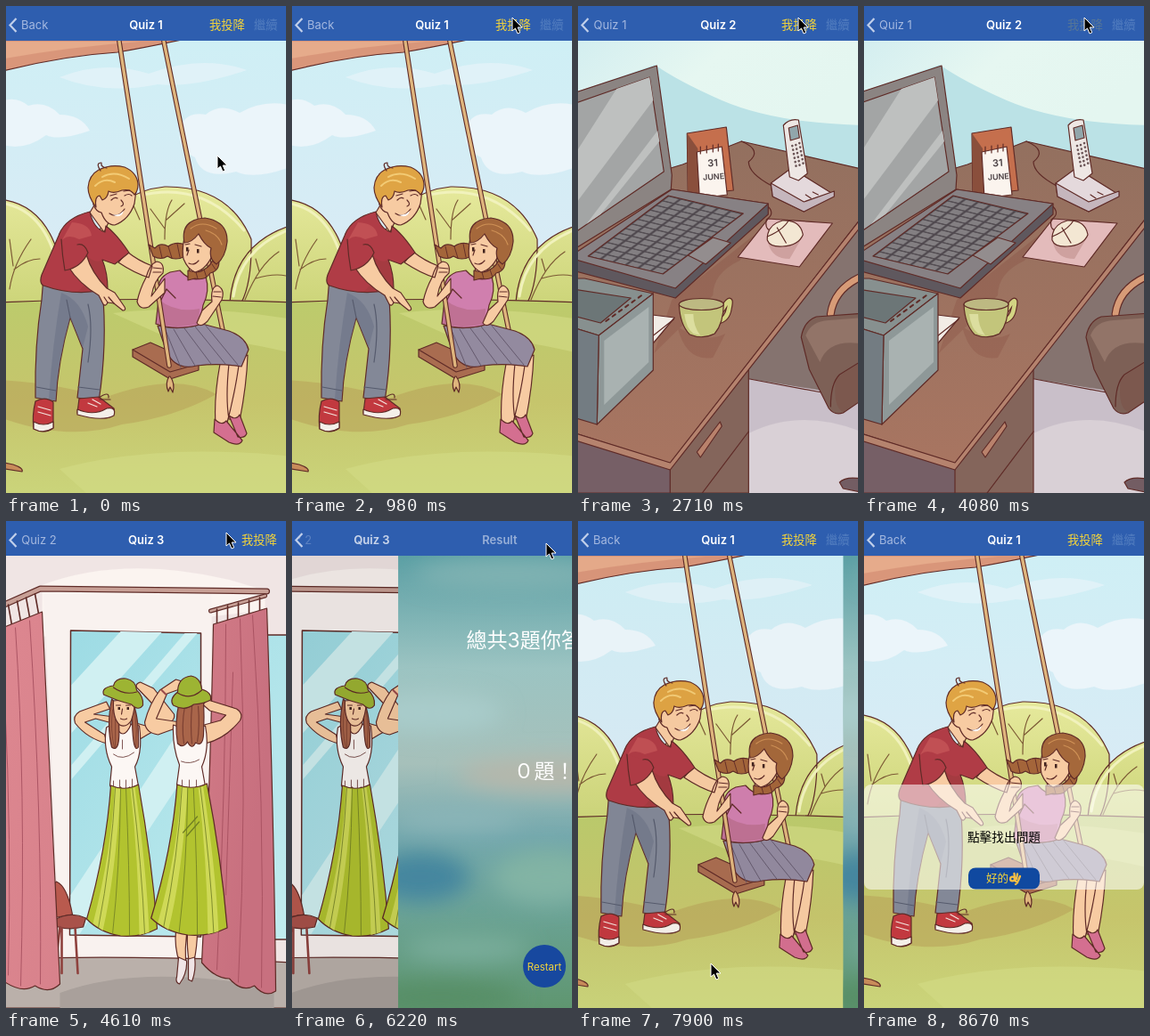
Animation, 314 px wide and 547 px high, one loop 9300 ms. Source, as an HTML page:

```html
<!DOCTYPE html>
<html lang="zh-Hant">
<head>
<meta charset="utf-8">
<title>Quiz</title>
<style>
html, body { margin: 0; width: 100%; height: 100%; overflow: hidden; }
svg { display: block; width: 100vw; height: 100vh; }
text { font: 13.3px Inter, "Noto Sans CJK TC", "Noto Sans CJK JP", sans-serif; stroke: none; }
.page { stroke: #5f2b27; stroke-width: 1.2; stroke-linejoin: round; stroke-linecap: round; }
.n { stroke: none; }
.l { fill: none; }
.skin { fill: #f7cba2; }
.shade { stroke: none; fill: #7a3a2e; opacity: .2; }
.mid { text-anchor: middle; }
.title { font-weight: 600; font-size: 13px; fill: #fff; text-anchor: middle; }
.label { font-size: 13px; fill: #a5b9e0; }
.give { fill: #f4d43a; }
.next { fill: #527dbf; }
</style>
</head>
<body>
<svg viewBox="0 0 314 547">
<defs>
  <clipPath id="bounds"><path d="M-7 39H321V547H-7Z"/></clipPath>
  <linearGradient id="sky" x2="0" y2="1"><stop stop-color="#cfeff5"/><stop offset="1" stop-color="#dbeaf5"/></linearGradient>
  <linearGradient id="grass" x2="0" y2="1"><stop stop-color="#bccb6c"/><stop offset=".5" stop-color="#c6c56c"/><stop offset="1" stop-color="#cbd67c"/></linearGradient>
  <linearGradient id="bush" x2="0" y2="1"><stop stop-color="#e6e99c"/><stop offset="1" stop-color="#cdd57a"/></linearGradient>
  <linearGradient id="drape" x2="1" y2=".2"><stop stop-color="#dd8790"/><stop offset=".6" stop-color="#d57f89"/><stop offset="1" stop-color="#c8707f"/></linearGradient>
  <linearGradient id="glass" x2="1" y2="1"><stop stop-color="#9ddbe4"/><stop offset="1" stop-color="#c2ecef"/></linearGradient>
  <linearGradient id="wood" x2="0" y2="1"><stop stop-color="#93705f"/><stop offset="1" stop-color="#a87561"/></linearGradient>
  <linearGradient id="wall" x2="1" y2=".3"><stop stop-color="#d3eef0"/><stop offset=".5" stop-color="#e6f7f1"/><stop offset="1" stop-color="#e4f6f0"/></linearGradient>
  <linearGradient id="haze" x2="0" y2="1">
    <stop stop-color="#5b9fa4"/><stop offset=".25" stop-color="#9cc4c2"/><stop offset=".46" stop-color="#a6c0ba"/>
    <stop offset=".62" stop-color="#74a8ad"/><stop offset=".8" stop-color="#6aa293"/><stop offset="1" stop-color="#5f9670"/>
  </linearGradient>
  <filter id="blur" x="-50%" y="-50%" width="200%" height="200%"><feGaussianBlur stdDeviation="12"/></filter>
  <pattern id="keys" width="10" height="10" patternUnits="userSpaceOnUse" patternTransform="matrix(.69 -.52 1.4 .34 10 281)">
    <path class="n" fill="#4f484e" d="M0 0H10V10H0Z"/><path class="n" fill="#837f82" d="M1 1H9V9H1Z"/>
  </pattern>
  <g id="skirt">
    <path fill="#b2c32f" d="M117 297Q132 304 148 296Q163 380 169 458Q150 468 128 466Q104 462 90 447Q112 370 117 297Z"/>
    <path class="n" fill="#cfd957" d="M121 300L128 301Q122 400 108 460L97 452Q118 370 121 300ZM139 301L144 299Q157 390 160 462L149 465Q148 380 139 301Z"/>
    <path class="l" stroke="#6f7d24" stroke-width=".8" d="M122 300Q118 380 103 457M128 301Q127 390 119 464M134 301Q138 390 138 466M141 299Q152 390 155 464"/>
  </g>
</defs>

<rect width="314" height="547"/>

<g class="page" clip-path="url(#bounds)">
  <path class="n" fill="url(#sky)" d="M-7 39H321V340H-7Z"/>
  <g class="n" fill="#ebf5fa">
    <path d="M-7 108Q10 100 25 112Q45 106 60 122Q84 122 94 140Q60 152 45 145Q20 164 -7 155Z"/>
    <path d="M196 134Q204 118 224 122Q240 108 262 120Q290 104 321 112V180Q280 196 258 186Q220 196 212 170Q190 160 196 134Z"/>
    <path opacity=".6" d="M60 80Q110 60 160 76Q220 54 270 72Q210 92 170 88Q110 100 60 80Z"/>
  </g>
  <path fill="url(#bush)" d="M-7 217Q42 222 59 280Q64 312 56 333H-7ZM86 333Q92 212 178 203Q250 202 275 262Q276 310 264 333ZM251 333Q256 266 321 246V333Z"/>
  <path class="l" stroke="#f1f2bc" stroke-width="3" d="M-7 221Q39 227 55 282M150 213Q220 196 267 252M255 326Q263 271 321 250"/>
  <path class="l" stroke="#7c5a35" d="M4 318Q8 290 28 262M8 292L4 262M9 296Q24 284 38 284M178 262Q178 230 186 218M178 250L162 228M180 240L200 222M150 240L142 222M268 330Q284 290 306 276M280 306Q300 300 314 303M284 298L280 284"/>
  <path fill="url(#grass)" d="M-7 333Q150 326 321 333V560H-7Z"/>
  <path class="n" fill="#b9a65a" opacity=".6" d="M-7 420Q60 424 110 440Q190 410 236 436Q190 462 130 470Q70 490 -7 462Z"/>
  <path class="n" fill="#d2da84" opacity=".7" d="M120 345Q220 334 321 352V390Q240 370 180 372ZM60 520Q170 490 321 506V547H90Z"/>
  <path fill="#d9967a" d="M-7 36H206Q160 46 125 52Q62 56 -7 74Z"/>
  <path class="n" fill="#e6ab8b" d="M-7 40H150Q70 46 -7 60Z"/>
  <path fill="#c88b5a" d="M-7 512L8 515Q20 519 18 523L-7 519Z"/>
  <g class="l">
    <path stroke-width="5.6" d="M177 40L245 374"/><path stroke="#dfb57d" stroke-width="3.4" d="M177 40L245 374"/>
  </g>

  <!-- girl -->
  <path class="skin" d="M250 402Q246 440 250 464L262 466Q270 425 271 392ZM240 402Q233 440 235 470L247 472Q258 430 262 396Z"/>
  <path fill="#d46f90" d="M250 460Q258 466 262 459L270 480Q268 486 260 484ZM234 464Q242 472 247 466L265 488Q262 495 250 490L233 479Z"/>
  <path fill="#a96c50" d="M142 386L162 378L216 402V409L184 419L142 394Z"/><path class="l" d="M142 386L184 411L216 402"/>
  <path fill="#938a9f" d="M170 359Q195 365 220 357L250 365Q269 372 272 386L264 405Q240 401 214 404Q190 410 180 388Z"/>
  <path class="l" stroke="#5f5468" stroke-width=".9" d="M178 362L196 406M188 363L212 404M200 362L230 402M212 360L246 402M224 359L260 403"/>
  <path fill="#d07fae" d="M184 299Q168 306 172 322L168 357Q190 365 217 358L221 336Q229 320 224 304Q208 312 195 297Z"/>
  <path class="shade" d="M172 330Q190 345 217 340L216 357Q190 363 169 357Z"/>
  <path class="l" d="M180 318l-6 12M180 318l10 10"/>
  <g class="l">
    <path stroke-width="5.6" d="M127 40L183 404"/><path stroke="#dfb57d" stroke-width="3.4" d="M127 40L183 404"/>
  </g>
  <path fill="#dfb57d" d="M183 416Q178 424 182 433L184 428L187 434Q190 424 184 416Z"/>
  <path class="skin" d="M126 288Q144 300 160 305L164 292Q148 286 136 276ZM178 306L163 326Q166 308 176 300Q178 288 169 287Q161 290 157 305Q150 318 147 332Q150 342 160 338L178 322ZM220 342L231 332Q229 316 237 314Q246 318 242 330L226 354Q218 362 214 356ZM205 288L206 304Q214 308 218 303L220 292Z"/>
  <path class="l" d="M165 294l10 1M165 299l9 0M233 321l8 0M232 326l9 1"/>
  <path fill="#a4653a" d="M201 268Q190 264 182 270Q173 265 167 272L160 268L165 281Q174 286 181 281Q190 287 201 281ZM238 280Q242 297 229 300Q223 309 212 306L204 308L204 297Q216 301 222 296Q230 292 233 282Z"/>
  <path class="l" stroke-width=".9" d="M182 270l4 13M172 270l3 13M192 267l3 15M222 296l3 9M213 299l2 7M231 290l4 6"/>
  <path class="skin" d="M200 260Q197 274 199 284Q204 296 212 299Q226 296 234 274Q226 250 205 252Z"/>
  <path fill="#a5683b" d="M200 266Q195 240 223 238Q249 242 248 265Q246 283 236 290Q227 284 230 272Q222 268 216 256Q208 266 200 266Z"/>
  <path class="l" stroke="#cf9156" d="M207 250Q220 240 236 250M224 252Q238 256 242 268"/>
  <path class="l" d="M205 289Q211 292 216 286M201 268l5 -1M212 268l7 2M205 274l-2 6"/>
  <path class="n" fill="#43251f" d="M202 271h2.500v4.500h-2.500ZM214 273h2.500v4.500h-2.500Z"/>

  <!-- boy -->
  <path fill="#838897" d="M42 304L40 330Q32 380 33 440L56 444Q58 400 72 350L86 385L80 440L104 444Q114 380 108 316Z"/>
  <path class="n" fill="#6d7487" opacity=".6" d="M62 322Q52 380 48 442L55 443Q58 400 72 350L86 384L92 360Q84 330 62 322Z"/>
  <path class="l" stroke="#565b6d" d="M34 428l22 4M81 428l24 3M72 350L68 330M92 400Q98 360 92 335"/>
  <path fill="#c2393f" d="M33 444Q44 438 53 445V474Q44 481 31 475Q29 460 33 444ZM82 441L104 439L121 452Q124 463 108 463L80 457Z"/>
  <path fill="#f4efe9" d="M31 467Q42 473 53 467V474Q42 481 31 475ZM80 453Q98 461 113 452Q124 450 121 460Q108 467 80 459Z"/>
  <path class="l" stroke="#f4e6df" d="M36 450l14 4M36 456l14 4M92 446l10 4M97 442l9 5"/><path class="l" d="M104 440q12-8 11 0M105 442l12 0"/>
  <path class="skin" d="M100 222L94 232L110 254L115 243Z"/>
  <path fill="#b03c46" d="M94 231Q66 238 59 258L40 302Q37 311 42 314Q78 327 114 318Q114 300 108 285L122 290L138 277Q124 256 112 247L111 254Q98 250 94 231Z"/>
  <path class="n" fill="#c9595b" opacity=".7" d="M74 243Q94 244 96 258L82 262Q66 254 60 268Z"/>
  <path class="shade" d="M90 280Q100 290 108 285L113 316L80 321Q96 310 90 280Z"/>
  <path class="skin" d="M70 293Q82 312 104 325L109 335Q112 338 114 333L121 334L131 342Q135 342 133 338L122 322L113 317Q96 300 90 279Z"/>
  <path class="l" d="M114 333L110 327M121 334L115 327"/>
  <path fill="#b03c46" d="M62 262Q63 280 66 297Q84 294 92 277Q88 266 80 268"/>
  <path class="skin" d="M106 206L102 214Q96 214 98 223Q101 231 107 232Q112 246 122 246Q138 240 144 222L146 207L130 196Z"/>
  <path fill="#dfa444" d="M101 226Q92 214 92 204Q93 190 104 184Q118 177 133 181Q147 187 148 200Q148 208 144 212Q140 205 130 207Q121 211 115 208Q114 216 108 218L105 213Q99 214 101 226Z"/>
  <path class="l" d="M106 185Q100 176 107 176Q106 181 113 182M116 233Q125 239 133 228M129 218q5 5 0 7M118 218q4-4 7-2M133 213q5-3 8 0M117 213l7-2M132 208l7-1"/>
  <path class="l" stroke="#f3cb75" stroke-width="2" d="M108 192Q122 184 138 194M100 202Q110 192 122 198"/>
  <path class="n" fill="#fff" d="M119 234Q126 236 132 230Q129 240 119 234Z"/>
</g>

<g class="page" clip-path="url(#bounds)">
  <path class="n" fill="#bbe2e6" d="M-7 39H321V260H-7Z"/>
  <path class="n" fill="url(#wall)" d="M-7 39H321V134Q220 132 160 106Q110 84 85 66L-7 98Z"/>
  <path class="n" fill="#85736f" d="M180 250H321V440H180Z"/>
  <path class="n" fill="#c9bfc9" d="M186 418L321 440V547H186Z"/><path class="n" fill="#d9d0d6" d="M190 480Q250 450 321 480V547H190Z"/><path class="l" d="M186 418L272 434"/>
  <path fill="#765f66" d="M-7 484L103 518V547H-7Z"/>
  <path fill="#84655b" d="M102 518L190 400V547H102Z"/><path class="l" d="M138 547L190 478"/>
  <path fill="#b9826c" d="M132 501L158 467L160 472L136 507Z"/>
  <path fill="url(#wood)" d="M-7 215L116 178L182 152L321 184V232L102 514L-7 479Z"/>
  <path fill="#b5836e" d="M-7 479L102 513L321 232V241L102 521L-7 487Z"/>
  <path class="shade" d="M104 330L213 244L180 286Q150 300 150 325L84 390ZM110 360Q140 380 164 368L150 395Q120 400 110 360Z"/>
  <path class="l" d="M182 152Q206 162 190 175Q190 188 216 202"/>
  <path fill="#c56f4d" d="M121 143L165 136L173 207L122 213Z"/><path class="n" fill="#8a4f3c" d="M121 143L133 160L136 212L122 213Z"/>
  <path fill="#fbf4ee" d="M132 164L160 158L166 212L135 216Z"/><path class="l" d="M136 158v8M143 157v8M150 156v8M156 155v8"/>
  <text class="mid" transform="rotate(-4 150 180)" x="150" y="180" style="font-size:11px;font-weight:600" fill="#493f42">31</text>
  <text class="mid" transform="rotate(-4 151 195)" x="151" y="195" style="font-size:9px;font-weight:600" fill="#493f42">JUNE</text>
  <path fill="#e4d9dc" d="M215 199L238 182L286 212L252 231L217 214Z"/><path fill="#c5b6bd" d="M215 199L252 220L286 208V214L252 231L217 214Z"/>
  <path fill="#eee7e4" d="M229 134Q236 126 246 128L256 188L246 196L236 192Z"/><path fill="#91a6ab" d="M235 137L245 134L247 148L237 151Z"/>
  <path class="l" stroke="#6b5557" stroke-width="2.6" stroke-dasharray=".1 4.5" d="M239 157l5 27M243 156l5 27M247 154l5 27"/><path class="l" d="M254 212l6 4M262 209l6 3"/>
  <path fill="#e3bbbb" d="M212 239L284 244L247 293L178 282Z"/>
  <path class="shade" d="M212 266Q230 276 250 260L236 284Q216 284 212 266Z"/>
  <path class="l" d="M208 222Q222 232 210 240Q208 250 214 252"/>
  <path fill="#f3e7d3" d="M211 263Q210 246 228 241Q248 240 251 257Q246 269 228 270Q214 271 211 263Z"/><path class="l" d="M211 259Q228 252 235 241M222 249l10 17"/>
  <path fill="#8b8482" d="M-7 98L87 67L104 190L103 206L-7 274Z"/><path fill="#a3a5a5" d="M-7 110L79 80L95 186L-7 256Z"/>
  <path class="n" fill="#bec0bf" d="M42 93L79 80L83 106L-7 226V170ZM88 140L90 152L24 234L8 245Z"/>
  <path fill="#5f585e" d="M-7 281L104 206L212 222V234L108 328L-7 297Z"/><path fill="#878184" d="M-7 279L104 206L212 222L108 317L-7 284Z"/>
  <path fill="url(#keys)" d="M10 281L100 213L184 233L94 301Z"/><path fill="#938d8e" d="M122 280L150 260L170 266L142 290Z"/>
  <path fill="#f2ece6" d="M82 347L107 350L82 380Z"/><path class="l" d="M82 371L106 352"/>
  <path fill="#87908f" d="M-7 306L6 306L83 323L22 370L-7 361Z"/><path fill="#6c7677" d="M-7 318L58 328L24 356L-7 348Z"/>
  <path fill="#8e9898" d="M22 370L83 323V409L20 470Z"/><path fill="#737c82" d="M-7 361L22 370L20 470L-7 462Z"/>
  <path class="n" fill="#a9b2b1" d="M28 376L78 338V400L28 448Z"/><path class="l" stroke-width="2" stroke-dasharray="4 5" d="M30 354L70 325"/>
  <path class="l" stroke-width="7" d="M161 340Q172 322 168 340Q166 352 156 354"/><path class="l" stroke="#d3d483" stroke-width="4.6" d="M161 340Q172 322 168 340Q166 352 156 354"/>
  <path fill="#c3c57b" d="M112 335Q113 358 124 369Q138 375 152 368Q162 356 162 334Z"/><path class="n" fill="#dcde9f" d="M118 346Q120 362 128 368L136 370Q128 360 128 346Z"/>
  <ellipse cx="137" cy="335" rx="25" ry="6.5" fill="#bdb982"/>
  <path class="l" stroke-width="9" d="M282 346Q286 316 321 302"/><path class="l" stroke="#d79b77" stroke-width="6.600" d="M282 346Q286 316 321 302"/>
  <path fill="#7d6056" d="M249 372Q252 354 266 349L321 345V440L296 457Q286 460 280 452L258 408Z"/>
  <path class="n" fill="#927468" d="M254 370Q260 354 280 353L321 350V380Q280 372 270 400Z"/>
  <path class="shade" d="M288 418L321 396V440L296 456Q284 450 288 418Z"/><path class="l" d="M282 450Q282 424 292 414L321 396"/>
  <path fill="#735d63" d="M292 535Q300 527 321 532V547L296 542Z"/>
</g>

<g class="page" clip-path="url(#bounds)">
  <path class="n" fill="#f0e5e4" d="M-7 39H321V547H-7Z"/><path class="n" fill="#fbf4f0" d="M40 72Q130 38 250 66L290 78V100L40 130Z"/>
  <path class="n" fill="#f9f2ef" d="M42 82H230V490H60Z"/>
  <path fill="#bab0aa" d="M-7 492Q150 487 321 496V547H-7Z"/><path class="n" fill="#a9a09b" d="M60 530Q150 496 300 525V547H60Z"/>
  <path fill="url(#glass)" stroke-width="1.500" d="M72 123L218 126V467L71 465ZM292 128H321V470H298Z"/>
  <path class="n" fill="#d0f0f2" d="M128 124L174 125L73 238V184ZM217 200V260L82 464H72V420ZM200 126L214 126L73 290V274Z"/>
  <path class="l" stroke-width="7" d="M-7 96L38 76L292 79"/><path class="l" stroke="#c8a096" stroke-width="4.6" d="M-7 96L38 76L292 79"/>
  <path class="l" stroke-width="5" d="M229 101L290 84"/><path class="l" stroke="#c8a096" stroke-width="2.8" d="M229 101L290 84"/>
  <path class="l" stroke-width="1.6" d="M2 94l4 23M12 90l4 23M22 86l4 22M32 82l4 22M236 99v16M248 95v16M260 92v16M272 89v15M284 86v14"/>
  <path fill="#b95a4e" d="M51 446Q48 410 56 405Q68 410 74 442Z"/><path fill="#a9524a" d="M54 448Q72 438 89 446L86 456Q70 460 54 455Z"/><path class="l" stroke-width="2.6" stroke="#8f423e" d="M60 456L56 490M77 457L80 508M62 457V508"/>
  <path fill="url(#drape)" d="M-7 121L40 102Q50 320 60 520Q48 532 32 522Q16 532 -7 514ZM232 116L292 98Q300 340 302 528Q290 536 278 522Q264 530 250 514Q234 514 219 496Q228 320 232 116Z"/>
  <path class="l" stroke="#a6505f" stroke-width=".9" d="M10 120Q22 300 16 522M26 112Q40 330 38 520M-2 200Q6 360 2 510M246 116Q246 300 236 504M262 110Q270 320 260 518M276 106Q290 320 286 524M254 170Q250 300 246 420"/>

  <path class="skin" d="M122 228L100 222L88 226L110 240L113 250Q90 244 77 227Q74 219 82 214L112 203L116 211L98 217L120 220ZM142 226L156 230L170 212L148 189Q142 184 150 181L165 188L188 217Q190 224 180 228L158 240L148 246ZM124 220L140 220L138 240L126 240Z"/>
  <path fill="#fcf7f4" d="M112 232Q118 228 122 228Q130 250 140 228L149 230Q153 260 144 276L148 298Q142 306 138 299Q132 307 128 299Q120 306 116 297L118 276Q108 256 112 232Z"/>
  <path class="l" stroke-width=".8" d="M120 262Q130 270 143 260M130 246v10M120 292v9M127 291v9M134 291v9M141 290v9"/>
  <path fill="#a9654a" d="M118 200Q112 230 118 254Q128 262 126 226L122 204ZM141 202Q149 220 148 254Q142 262 141 226Z"/>
  <path class="l" stroke="#7c4032" stroke-width=".8" d="M119 212Q116 234 121 255M122 220v34M144 214Q147 234 145 255"/>
  <path class="skin" d="M120 202Q119 222 127 229Q134 233 140 224Q145 210 143 200Z"/>
  <path class="l" d="M123 207l5 0M134 207l5 0M130 211l-1 6M128 222q4 2 7 0"/><path class="n" fill="#43251f" d="M125 209h2.5v3h-2.5ZM135 209h2.5v3h-2.5Z"/>
  <path fill="#9db433" d="M109 195Q106 187 120 185Q122 176 134 177Q145 179 146 190Q154 197 153 207Q148 214 140 206Q124 202 109 195Z"/><path class="l" d="M120 187Q132 196 146 192"/>
  <use href="#skirt"/>

  <path class="skin" d="M190 460Q188 478 194 496H201Q200 480 202 464ZM203 462Q202 480 205 496H210Q214 478 214 460Z"/>
  <path fill="#f0e5e6" d="M193 490L202 494Q203 508 194 520Q189 518 191 512ZM204 492L211 490Q213 504 208 517L204 515Z"/>
  <path class="skin" d="M192 232L170 240Q156 238 155 226Q160 206 172 190L190 178L200 181L194 189L180 194L168 222L195 226ZM218 230L240 224L246 218L228 213L220 206L226 201L258 211Q266 216 262 224Q246 244 223 250Z"/>
  <path class="l" stroke="#9a4a4a" stroke-width="2" d="M174 190l5 5"/>
  <path fill="#fcf7f4" d="M187 229Q206 236 223 230Q228 256 219 276L223 298Q216 306 212 299Q206 307 202 299Q196 305 191 296L194 274Q186 254 187 229Z"/><path class="l" stroke-width=".8" d="M197 291v9M205 291v9M213 291v9M196 270Q206 274 216 268"/>
  <path fill="#a9654a" d="M194 202Q188 228 192 250Q198 256 203 248Q208 258 212 249Q220 254 221 240Q222 220 221 200Z"/><path class="l" stroke="#7c4032" d="M200 208Q196 230 199 250M208 208Q206 230 208 250M215 208Q217 230 214 248"/>
  <path fill="#9db433" d="M187 207Q182 200 192 192Q192 176 207 174Q218 176 219 189Q231 193 229 201Q222 205 210 206Q200 214 187 207Z"/><path class="l" d="M192 193Q206 202 219 190"/>
  <use href="#skirt" transform="matrix(1.08 0 0 1 65 -1)"/>
  <path class="l" stroke="#6f7d24" d="M198 350l16-18M202 354l14-16"/>
</g>

<g class="page" clip-path="url(#bounds)">
  <g class="n">
    <path fill="url(#haze)" d="M-7 39H321V547H-7Z"/>
    <g filter="url(#blur)">
      <ellipse cx="120" cy="60" rx="110" ry="18" fill="#80b2b2"/>
      <ellipse cx="30" cy="215" rx="80" ry="22" fill="#a9cccb"/>
      <ellipse cx="170" cy="285" rx="110" ry="20" fill="#b6b7ab"/>
      <ellipse cx="60" cy="335" rx="70" ry="12" fill="#8cb6b9"/>
      <ellipse cx="18" cy="400" rx="55" ry="28" fill="#44869f"/>
      <ellipse cx="160" cy="400" rx="60" ry="30" fill="#82b4a4"/>
      <ellipse cx="70" cy="480" rx="70" ry="14" fill="#7aae9c"/>
      <ellipse cx="270" cy="190" rx="50" ry="70" fill="#84b3b8"/>
      <ellipse cx="40" cy="535" rx="90" ry="18" fill="#568e66"/>
    </g>
  </g>
  <g class="mid" fill="#fff">
    <text x="157" y="142" style="font-size:23px">總共3題你答對了</text>
    <text x="157" y="289" style="font-size:23px">０題！</text>
    <circle class="n" cx="157" cy="500" r="24" fill="#17489f"/>
    <text class="give" x="157" y="504.5" style="font-size:11.5px">Restart</text>
  </g>
</g>

<rect width="314" height="39" fill="#2e5eaf"/>
<g id="nav"></g>
<path fill="#2e5eaf" d="M0 0H8V39H0Z"/>
<path d="M11.5 14L4.5 21.5L11.5 29" fill="none" stroke="#c0cfea" stroke-width="2.2"/>

<g id="popup" class="mid">
  <rect y="296" width="314" height="118" rx="8" fill="#fff" opacity=".56"/>
  <text x="157" y="360" style="font-size:13.7px">點擊找出問題</text>
  <rect x="117" y="389.5" width="80" height="24" rx="8" fill="#1049a0"/>
  <text class="give" x="149.5" y="406" style="font-size:12.5px">好的</text>
  <g fill="none" stroke="#f6bf45" stroke-width="2.3" stroke-linecap="round">
    <circle cx="166.5" cy="402" r="2.4"/><path d="M169 401L168.5 396M171 402L172 396.5M173 404L175 399M169.500 404L172 406L170 408"/>
  </g>
</g>
<path id="cursor" d="M0 0V15L3.5 12L6 18L8.7 16.8L6.2 11H11Z" fill="#000" stroke="#fff"/>
</svg>
<script>
const LOOP = 9300, WIDTH = 328, CENTER = 157, LABEL_X = 17;
const $ = id => document.getElementById(id);
const clamp = v => Math.max(0, Math.min(1, v));
const ease = v => v * v * (3 - 2 * v);

// Critically damped spring, time in ms
function spring(t) {
  const k = Math.max(0, t) * 0.01826;
  return k > 9.5 ? 1 : 1 - (1 + k) * Math.exp(-k);
}

const both = '<text class="give" x="228" y="26">我投降</text><text class="next" x="278" y="26">繼續</text>';
const bars = [
  { title: 'Quiz 1', back: 'Back', width: 29, slide: 85, buttons: both },
  { title: 'Quiz 2', back: 'Quiz 1', width: 39, slide: 85, buttons: both },
  { title: 'Quiz 3', back: 'Quiz 2', width: 39, slide: 85, buttons: '<text class="give" x="264" y="26">我投降</text>' },
  { title: 'Result', back: 'Quiz 3', width: 39, slide: 172, buttons: '' }
];
$('nav').innerHTML = bars.map(b => `<g><text class="label" y="26">${b.back}</text>
  <text class="title" y="26">${b.title}</text><g>${b.buttons}</g></g>`).join('');
const pages = [...document.querySelectorAll('.page')];
const items = [...$('nav').children];

// low lies under high; a pop uncovers low again
const moves = [
  { at: -9000, low: 0, high: 3, pop: true },
  { at: 2290, press: 2240, low: 0, high: 1 },
  { at: 4135, press: 4080, low: 1, high: 2 },
  { at: 6107, press: 6040, low: 2, high: 3 },
  { at: 7666, low: 0, high: 3, pop: true }
];
const cursorKeys = [
  [30, 237, 168], [250, 284, 106], [450, 273, 57], [690, 273, 57], [980, 247, 13], [5540, 247, 13],
  [5680, 285, 25], [6480, 285, 25], [6920, 147, 400], [7060, 147, 400], [7380, 149, 497]
];

function place(el, x, opacity) {
  el.setAttribute('x', x);
  el.style.opacity = opacity;
}

function drawBar(item, bar, s, isLow) {
  const [label, title, buttons] = item.children;
  const q = s ** 1.2;
  if (isLow) {
    place(title, CENTER - 121 * q, 1 - s ** 3);
    place(label, LABEL_X - (bar.width + LABEL_X) * s, 1 - s);
    buttons.style.opacity = clamp(1 - 2 * s);
  } else {
    place(title, CENTER + bar.slide * (1 - q), s ** 1.4);
    place(label, LABEL_X + 121 * (1 - q), s ** 3);
    buttons.style.opacity = clamp(2 * s);
  }
}

function cursorAt(t) {
  const i = cursorKeys.findIndex(k => k[0] > t);
  if (i < 1) return cursorKeys.at(i).slice(1);
  const [t0, x0, y0] = cursorKeys[i - 1], [t1, x1, y1] = cursorKeys[i];
  const e = ease((t - t0) / (t1 - t0));
  return [x0 + (x1 - x0) * e, y0 + (y1 - y0) * e];
}

function draw(t) {
  const move = moves.findLast(m => m.at <= t);
  const p = spring(t - move.at), s = move.pop ? 1 - p : p;
  const navS = move.pop ? clamp(1.1 * s - 0.1) : s;
  const pressed = moves.some(m => t >= m.press && t < m.at);
  pages.forEach((page, i) => {
    const isLow = i === move.low;
    const shown = isLow ? s < 1 : i === move.high && s > 0;
    page.style.display = items[i].style.display = shown ? '' : 'none';
    if (!shown) return;
    page.setAttribute('transform', `translate(${isLow ? -0.3 * WIDTH * s : WIDTH * (1 - s)} 0)`);
    page.style.opacity = isLow ? 1 - 0.1 * s : 1;
    drawBar(items[i], bars[i], navS, isLow);
    const give = items[i].querySelector('.give');
    if (give) give.style.opacity = pressed ? 0.2 : 1;
  });
  $('cursor').setAttribute('transform', `translate(${cursorAt(t)})`);
  $('cursor').style.display = t < 8170 ? '' : 'none';
  $('popup').style.opacity = ease(clamp((t - 8170) / 500));
}

function tick() {
  draw(performance.now() % LOOP);
  requestAnimationFrame(tick);
}
tick();
</script>
</body>
</html>
```
